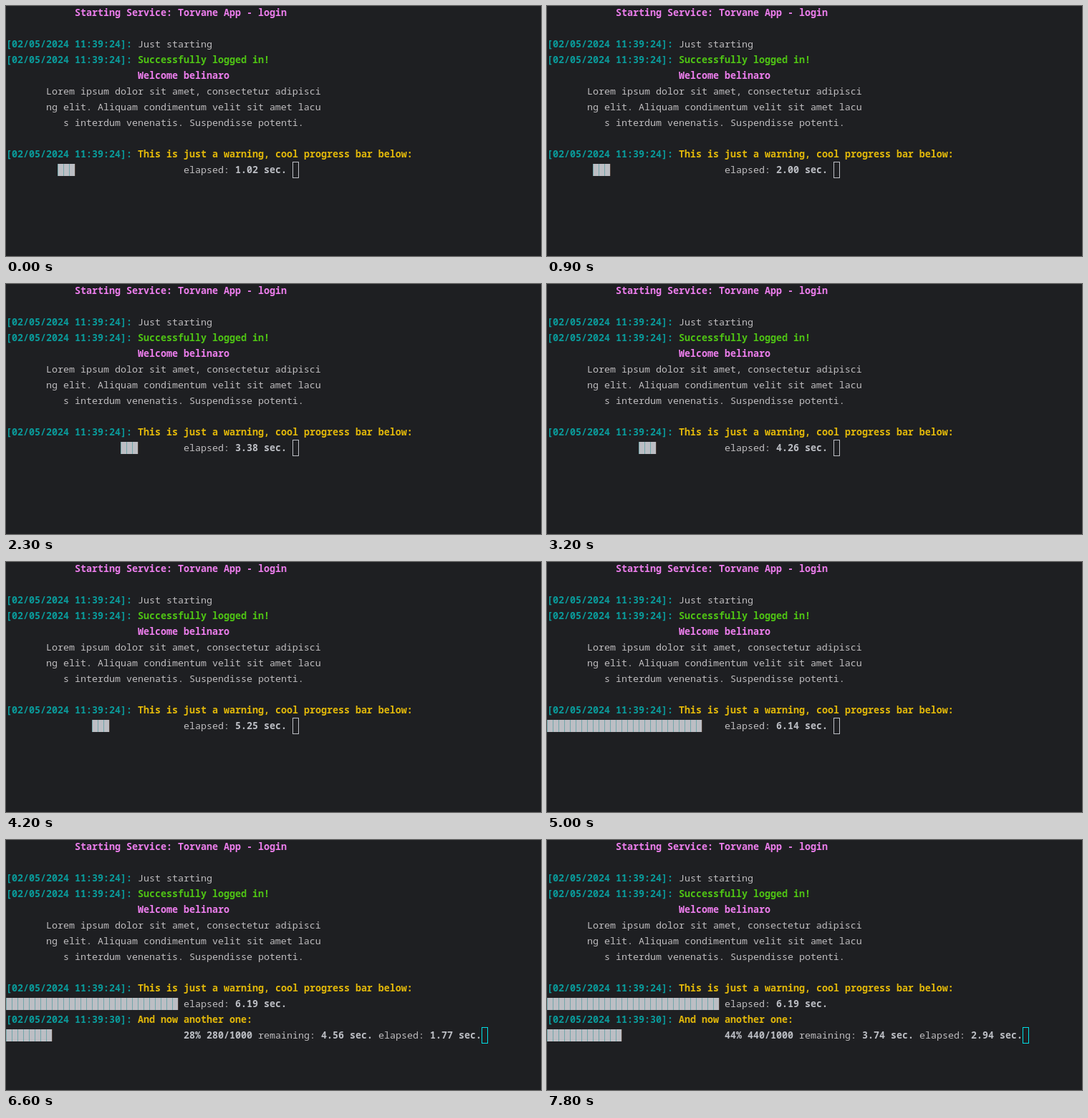
Animation of 747 by 350 pixels, one loop 8000 ms. Source, as an HTML page:

```html
<!DOCTYPE html>
<html lang="en">
<head>
<meta charset="utf-8">
<title>Terminal progress</title>
<style>
html, body { margin: 0; width: 100%; height: 100%; overflow: hidden; background: #1e1f22; }
svg { display: block; }
text { font: 500 13.333px "Noto Sans Mono", "DejaVu Sans Mono", monospace; white-space: pre; fill: #bfbdbf; }
.b { font-weight: 700; fill: #bcbec4; }
.pink { fill: #ed7eed; }
.teal { fill: #0a9b9b; }
.green { fill: #4fc414; }
.gold { fill: #e2b80a; }
</style>
</head>
<body>
<svg id="stage" width="747" height="350" viewBox="0 0 747 350"></svg>
<script>
const NS = "http://www.w3.org/2000/svg";
const stage = document.getElementById("stage");
const CELL = 8, LINE = 22, BAR = 30, LOOP = 8000;

function add(tag, attrs, parent = stage) {
  const el = document.createElementNS(NS, tag);
  for (const k in attrs) el.setAttribute(k, attrs[k]);
  return parent.appendChild(el);
}

function write(row, col, str, cls = "", parent = stage) {
  const el = add("text", { x: col * CELL, y: row * LINE + 14, class: cls }, parent);
  el.textContent = str;
  return el;
}

function place(el, col, str) {
  el.setAttribute("x", col * CELL);
  if (str !== undefined) el.textContent = str;
}

function stamp(row, time, parent) {
  write(row, 0, `[02/05/2024 ${time}]:`, "b teal", parent);
}

// Bar of block cells, each with a tinted left seam and a faint last edge
function makeBar(row, parent) {
  const y = row * LINE + 1;
  const fill = add("rect", { y, height: 17, fill: "#bcbec4" }, parent);
  const seams = add("path", { stroke: "#72a6aa" }, parent);
  const edge = add("path", { stroke: "#4b3d36" }, parent);
  const line = col => `M${col * CELL + 0.5} ${y}v17`;
  return (from, to) => {
    from = Math.max(0, from);
    to = Math.min(BAR, to);
    fill.setAttribute("x", from * CELL);
    fill.setAttribute("width", Math.max(0, to - from) * CELL);
    let d = "";
    for (let c = from; c < to; c++) d += line(c);
    seams.setAttribute("d", d);
    edge.setAttribute("d", d && line(to));
  };
}

function makeCursor(row, color, parent) {
  return add("rect", { y: row * LINE - 1.5, width: 8, height: 22, fill: "none", stroke: color }, parent);
}

// Static log lines
write(0, 12, "Starting Service: Torvane App - login", "b pink");
stamp(2, "11:39:24");
write(2, 23, "Just starting");
stamp(3, "11:39:24");
write(3, 23, "Successfully logged in!", "b green");
write(4, 23, "Welcome belinaro", "b pink");
write(5, 7, "Lorem ipsum dolor sit amet, consectetur adipisci");
write(6, 7, "ng elit. Aliquam condimentum velit sit amet lacu");
write(7, 10, "s interdum venenatis. Suspendisse potenti.");
stamp(9, "11:39:24");
write(9, 23, "This is just a warning, cool progress bar below:", "b gold");

// Scrolling bar
const bar1 = makeBar(10);
write(10, 31, "elapsed:");
const time1 = write(10, 40, "", "b");
const cursor1 = makeCursor(10, "#bcbec4");
cursor1.setAttribute("x", 400.5);

// Percentage bar
const second = add("g", {});
stamp(11, "11:39:30", second);
write(11, 23, "And now another one:", "b gold", second);
const bar2 = makeBar(12, second);
const count = write(12, 31, "", "b", second);
const remLabel = write(12, 44, "remaining:", "", second);
const remTime = write(12, 55, "", "b", second);
const elLabel = write(12, 65, "elapsed:", "", second);
const elTime = write(12, 74, "", "b", second);
const cursor2 = makeCursor(12, "#00dfe6", second);

// Ticks of 100 ms on which the terminal did not refresh
const idle = [13, 26, 38, 51, 55, 59, 65, 67, 68, 70, 74];
const steps = tick => tick - idle.filter(i => i <= tick).length;
const sec = s => s.toFixed(2) + " sec.";

const clock = [[0, 1.02], [9, 2], [22, 3.38], [39, 5.25], [47, 6.14]];
function elapsedAt(n) {
  const i = Math.max(1, clock.findIndex(k => k[0] >= n));
  const [n0, e0] = clock[i - 1], [n1, e1] = clock[i];
  return e0 + (e1 - e0) * (n - n0) / (n1 - n0);
}

function drawFirst(n, done) {
  const e = done ? 6.19 : elapsedAt(n);
  time1.textContent = sec(e);
  cursor1.setAttribute("visibility", done ? "hidden" : "visible");
  if (done) bar1(0, BAR);
  else if (n >= 44) bar1(0, Math.round(27 - (47 - n) * 20 / 3));
  else {
    // A three-cell block slides in from the left and out at the right
    const run = Math.round(12 + (e - 1.02) * 32.65) % 33;
    bar1(run - 3, run);
  }
}

const opening = [2, 4, 6, 10, 14];
function drawSecond(k) {
  const p = k < 5 ? opening[k] : 16 + (k - 5) * 2;
  const e = p < 28 ? p * 0.0633 : 1.773 + (p - 28) * 0.0729;
  const label = `${p}% ${p * 10}/1000`;
  const col = 31 + label.length;
  bar2(0, Math.floor(p * BAR / 100));
  count.textContent = label;
  place(remLabel, col + 1);
  place(remTime, col + 12, sec(e * (100 - p) / p));
  place(elLabel, col + 22);
  place(elTime, col + 31, sec(e));
  cursor2.setAttribute("x", (col + 40) * CELL + 0.5);
}

function draw(t) {
  const n = steps(Math.floor(t / 100));
  const done = n >= 48;
  drawFirst(n, done);
  second.setAttribute("visibility", done ? "visible" : "hidden");
  if (done) drawSecond(n - 48);
}

const start = performance.now();
function loop() {
  draw((performance.now() - start) % LOOP);
  requestAnimationFrame(loop);
}
loop();
</script>
</body>
</html>
```
